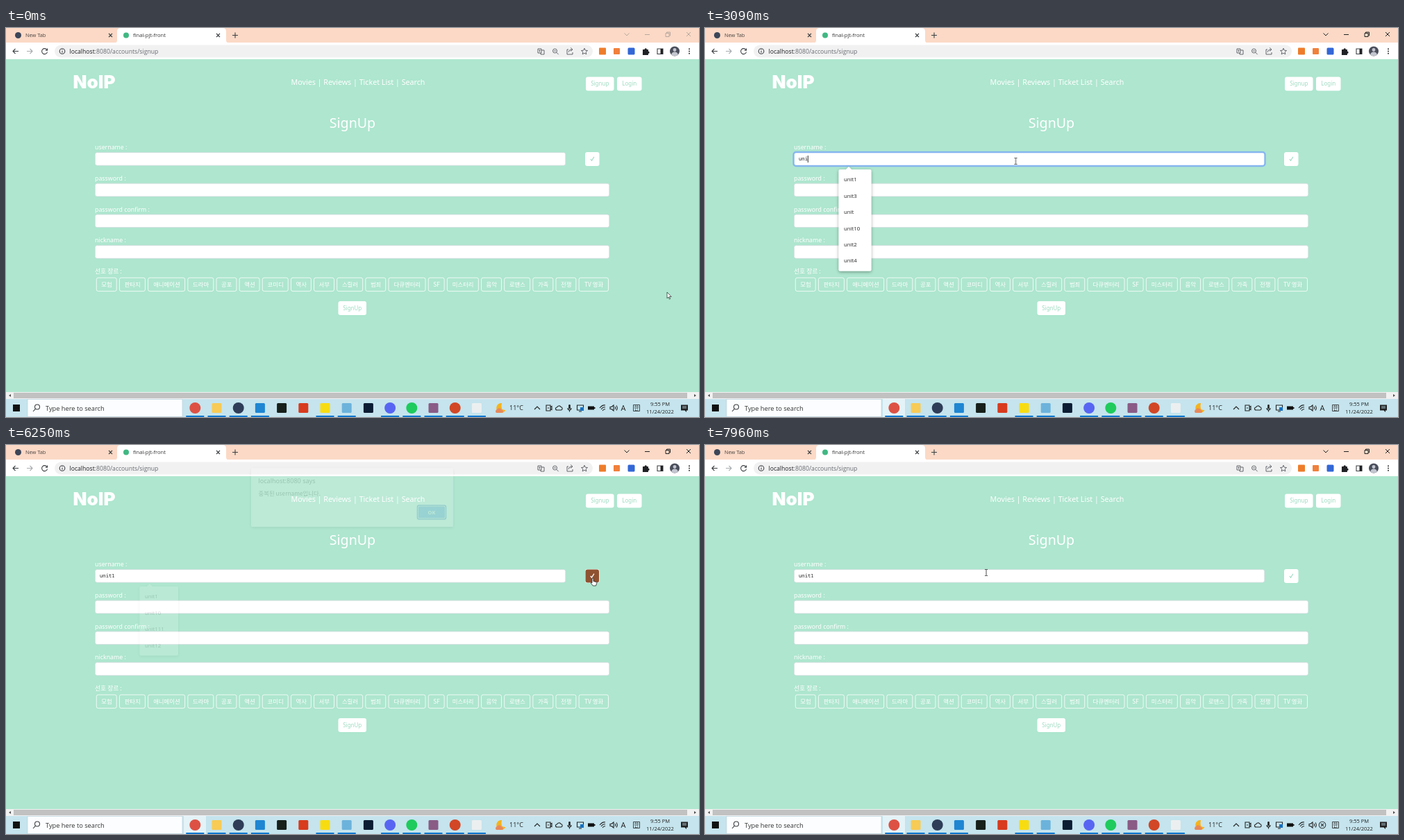
An HTML page for the animation above (8 s loop, 998x561 px).

```html
<!DOCTYPE html>
<html lang="en">
<head>
<meta charset="utf-8">
<title>Sign up form</title>
<style>
html, body { margin: 0; width: 100%; height: 100%; overflow: hidden; background: #aee6cf; }
svg { display: block; width: 100vw; height: 100vh; }
text { font-family: "Open Sans", "Noto Sans", sans-serif; white-space: pre; }
.page text { font-family: "Noto Sans", "Noto Sans CJK KR", sans-serif; }
.kr, .page .kr { font-family: "Noto Sans CJK KR", "Noto Sans CJK", sans-serif; }
.page .logo { font-family: Inter, sans-serif; font-weight: 900; }
.page .mono { font-family: "Noto Sans Mono", "DejaVu Sans Mono", monospace; font-weight: 500; }
.mid { text-anchor: middle; }
.line { fill: none; stroke: #3c4043; stroke-width: 1.1; }

/* one loop is 8 s, so 1% is 80 ms */
.cut { animation: 8s step-end infinite; }
.flow { animation: 8s linear infinite; }
.off { opacity: 0; }

#win { animation-name: win; stroke: #b9a79d; }
@keyframes win { 20.25%, 100% { stroke: #222; } }
#chatTile { animation-name: chatTile; }
@keyframes chatTile { 0%, .8% { opacity: 0; } 1.6%, 20% { opacity: 1; } 21.2%, 100% { opacity: 0; } }
#webTile { animation-name: webTile; }
@keyframes webTile { 0%, 20% { opacity: 0; } 21.2%, 100% { opacity: 1; } }
#imeA { animation-name: imeA; }
@keyframes imeA { 0% { opacity: 1; } 1.25% { opacity: 0; } 20.25% { opacity: 1; } 79% { opacity: 0; } }
#imeK { animation-name: imeK; }
@keyframes imeK { 1.25% { opacity: 1; } 20.25% { opacity: 0; } }
#imeX { animation-name: imeX; }
@keyframes imeX { 79%, 100% { opacity: 1; } }

#ring { animation-name: ring; }
@keyframes ring { 0%, 20% { opacity: 0; } 21.6%, 76.8% { opacity: 1; } 77.8%, 100% { opacity: 0; } }
#typing { animation-name: typing; }
@keyframes typing {
  0% { transform: none; }
  31.875% { transform: translateX(4.32px); }
  35.25% { transform: translateX(8.64px); }
  38.625% { transform: translateX(12.96px); }
  43.5% { transform: translateX(17.28px); }
  50.25%, 100% { transform: translateX(21.6px); }
}
#caret { animation-name: caret; }
@keyframes caret {
  20.25% { opacity: 1; } 26.875% { opacity: 0; }
  31.875% { opacity: 1; } 59.375% { opacity: 0; }
  66% { opacity: 1; } 72.6% { opacity: 0; }
}
#popA { animation-name: popA; }
@keyframes popA { 31.875% { opacity: 1; } 51.5% { opacity: 0; } }
#popB { animation-name: popB; }
@keyframes popB {
  0%, 51.49% { opacity: 0; } 51.5%, 76.8% { opacity: 1; }
  78.125% { opacity: .16; } 79%, 100% { opacity: 0; }
}
#hover { animation-name: hover; }
@keyframes hover { 0%, 72.2% { opacity: 0; } 73%, 96% { opacity: 1; } 97.5%, 100% { opacity: 0; } }
#dialog { animation-name: dialog; }
@keyframes dialog {
  0%, 77.4% { opacity: 0; transform: translateY(-11px); }
  78.125% { opacity: .18; transform: translateY(-10px); }
  80.75%, 95.25% { opacity: 1; transform: translateY(0); }
  98.5%, 100% { opacity: 0; transform: translateY(-7px); }
}
#cursor { animation-name: cursor; }
@keyframes cursor {
  0%, 3.4% { transform: translate(952px, 381px); }
  5.5% { transform: translate(900px, 402px); }
  7.6% { transform: translate(785px, 415px); }
  9.7% { transform: translate(630px, 393px); }
  11.8% { transform: translate(500px, 343px); }
  13.625%, 13.9% { transform: translate(440px, 316px); }
  14.5% { transform: translate(442px, 292px); }
  16.125%, 18% { transform: translate(451px, 203px); }
  18.625%, 55.2% { transform: translate(447.5px, 192px); }
  55.25%, 62.8% { transform: translate(446.8px, 192px); }
  66.25% { transform: translate(570px, 199px); }
  70% { transform: translate(770px, 217px); }
  71.8% { transform: translate(823px, 203px); }
  73%, 84.2% { transform: translate(845px, 192px); }
  84.875% { transform: translate(833.5px, 192px); }
  88.5% { transform: translate(715px, 152px); }
  92.5%, 94.6% { transform: translate(615px, 107px); }
  99.4%, 100% { transform: translate(405px, 184px); }
}
#arrow { animation-name: arrow; }
@keyframes arrow {
  0% { opacity: 1; } 13.1% { opacity: 0; } 14.1% { opacity: 1; } 18.25% { opacity: 0; }
  66.25% { opacity: 1; } 72.4% { opacity: 0; } 85.4% { opacity: 1; } 98.6% { opacity: 0; }
}
#beam { animation-name: beam; }
@keyframes beam {
  13.1% { opacity: 1; } 14.1% { opacity: 0; } 18.25% { opacity: 1; }
  66.25% { opacity: 0; } 98.6%, 100% { opacity: 1; }
}
#hand { animation-name: hand; }
@keyframes hand { 72.4% { opacity: 1; } 85.4% { opacity: 0; } }
</style>
</head>
<body>
<svg viewBox="0 0 998 561">
  <defs>
    <filter id="soft" x="-20%" y="-20%" width="140%" height="150%">
      <feDropShadow dx="0" dy="1.5" stdDeviation="2" flood-opacity=".35"/>
    </filter>
  </defs>

  <!-- browser frame -->
  <rect width="998" height="22" fill="#fbd9c6"/>
  <rect y="21" width="998" height="24" fill="#fff"/>
  <path d="M156 21.5q4 0 4-4V5q0-5 5-5h147q5 0 5 5v12.5q0 4 4 4z" fill="#fff"/>
  <circle cx="17.5" cy="10.5" r="4.5" fill="#3c4658"/>
  <circle cx="173" cy="10.5" r="4" fill="#41b883"/>
  <text x="28" y="13.2" font-size="7.4" fill="#4a4340">New Tab</text>
  <text x="183" y="13.2" font-size="7.6" fill="#333">final-pjt-front</text>
  <path class="line" d="M148 8l5 5m0-5l-5 5M303 8l5 5m0-5l-5 5M326 10.5h8m-4-4v8"/>
  <g id="win" class="cut" fill="none" stroke-width="1">
    <path d="M890.5 7.5l3.5 3.5 3.5-3.5M920 9.5h7M950 7.5h5v5h-5zM951.5 7V6h5v5h-1M980 6l6 6m0-6l-6 6"/>
  </g>
  <path class="line" d="M18 33.5h-8m3.5-3.5L10 33.5l3.5 3.5"/>
  <path class="line" style="stroke:#a9acaf" d="M30 33.5h8m-3.5-3.5l3.5 3.5-3.5 3.5"/>
  <path class="line" d="M59 31.5a4 4 0 1 0 .5 3M59.5 29.5v2.8h-2.8"/>
  <rect x="70" y="24.5" width="775" height="18" rx="9" fill="#f1f1f2"/>
  <circle class="line" cx="81" cy="33.5" r="3.8"/>
  <path class="line" d="M81 33v2.5m0-4.2v.8"/>
  <text x="91.5" y="36.7" font-size="8.67" fill="#666a6e"><tspan fill="#202124">localhost</tspan>:8080/accounts/signup</text>
  <g class="line" style="stroke:#55595d;stroke-width:.9">
    <path d="M766 30h5v6h-5zM771 32h4v6h-5v-2M767.5 32h2m-1 0v2.5"/>
    <circle cx="790.5" cy="33" r="3"/><path d="M792.7 35.2l3 3M789 33h3"/>
    <path d="M810 31h-2v7h8v-3M810 35q.5-4 5-4m-2-2.5l3 2.5-3 2.5"/>
    <path d="M833 29.2l1.3 3 3.2.3-2.4 2.2.7 3.2-2.8-1.7-2.8 1.7.7-3.2-2.4-2.2 3.2-.3z"/>
  </g>
  <rect x="854" y="28.5" width="10" height="10" rx="1" fill="#ee7d2b"/>
  <rect x="875" y="29" width="9" height="9" rx="1" fill="#f0803c"/>
  <rect x="895.5" y="28.5" width="10" height="10" rx="1.5" fill="#3367d6"/>
  <path d="M917 31h2.5a1.7 1.7 0 0 1 3.4 0h2v2.5a1.7 1.7 0 0 1 0 3.4v2h-8z" fill="#202124"/>
  <path class="line" d="M938 30h8v7.5h-8z"/><path d="M942.5 30h3.5v7.5h-3.5z" fill="#202124"/>
  <circle cx="963" cy="33.5" r="7" fill="#4b4f5c"/>
  <path d="M958 38.5q1-4 5-4t5 4q-5 4-10 0z" fill="#c3c6cf"/><circle cx="963" cy="31.5" r="2.4" fill="#c3c6cf"/>
  <g fill="#333"><circle cx="984" cy="30.3" r="1"/><circle cx="984" cy="33.5" r="1"/><circle cx="984" cy="36.7" r="1"/></g>

  <!-- web page -->
  <g class="page">
    <rect y="45" width="998" height="480" fill="#aee6cf"/>
    <text class="logo" x="96.5" y="87" font-size="26" fill="#fff">NolP</text>
    <text class="mid" x="507" y="81.8" font-size="10.7" fill="#fff" font-weight="500">Movies | Reviews | Ticket List | Search</text>
    <text class="mid" x="499" y="144" font-size="19.6" fill="#fff">SignUp</text>
    <g id="form"></g>
    <rect id="ring" class="flow" x="127.5" y="179" width="679" height="20" rx="3.5" fill="#fff" stroke="#86b6ee" stroke-width="2.4"/>
    <text class="mono" x="135" y="191.3" font-size="7.2" fill="#222">unit1</text>
    <g id="typing" class="cut">
      <rect x="135" y="183" width="28" height="12" fill="#fff"/>
      <path id="caret" class="cut off" d="M135.3 184v10" stroke="#111" stroke-width=".9"/>
    </g>
    <g id="hover" class="flow">
      <rect x="834.5" y="179.5" width="19.5" height="19" rx="3" fill="#8f5230"/>
      <path d="M841.8 189l1.7 2.2 3.4-5.5" fill="none" stroke="#fff" stroke-width="1.3"/>
    </g>
  </g>
  <g id="popA" class="cut off"></g>
  <g id="popB" class="flow"></g>

  <g id="dialog" class="flow">
    <rect x="353" y="43" width="291" height="85" rx="2" fill="#fff" filter="url(#soft)"/>
    <text x="363.5" y="65" font-size="9.1" fill="#222">localhost:8080 says</text>
    <text class="kr" x="363.5" y="83" font-size="8.4" fill="#333">중복된 username입니다.</text>
    <rect x="592.5" y="97" width="41" height="20" rx="2.5" fill="#fff" stroke="#2f66c4" stroke-width="1.6"/>
    <rect x="594" y="98.5" width="38" height="17" rx="1.5" fill="#3b78e0"/>
    <text class="mid" x="613" y="109.8" font-size="7.5" font-weight="700" fill="#fff">OK</text>
  </g>

  <!-- scrollbar and taskbar -->
  <rect y="525" width="998" height="10" fill="#f1f1f1"/>
  <rect x="11" y="526" width="970" height="8" fill="#c1c1c1"/>
  <path d="M7 528v4l-3-2zM991 528v4l3-2z" fill="#505050"/>
  <rect y="535" width="998" height="26" fill="#c5e4ed"/>
  <rect x="10" y="543" width="10" height="10" fill="#111"/>
  <rect x="31" y="535.5" width="223" height="25" fill="#fbfdfe" stroke="#b9ced5" stroke-width=".6"/>
  <circle class="line" cx="45" cy="546.5" r="3.5"/><path class="line" d="M42.5 549.2l-3.5 3.8"/>
  <text x="57" y="551.5" font-size="9.25" fill="#333">Type here to search</text>
  <rect id="webTile" class="flow" x="256" y="535" width="32" height="26" fill="#e3f3f7"/>
  <rect id="chatTile" class="flow" x="445" y="535" width="29" height="26" fill="#f1f9fb"/>
  <g id="apps"></g>
  <path d="M714 541a7 7 0 1 0 5.5 10q-8 1-5.5-10z" fill="#f5b41d"/>
  <path d="M706 555a3 3 0 0 1 1-5 4 4 0 0 1 7 1 2 2 0 0 1 0 4z" fill="#e8895b"/>
  <text x="725" y="551.3" font-size="9" fill="#222">11°C</text>
  <g class="line" style="stroke:#222">
    <path d="M761 550l4-4 4 4M778 544h6v8h-6zM784 547l2-1.5v5l-2-1.5M780 548h2"/>
    <path d="M793.5 551a2 2 0 0 1 0-4 3 3 0 0 1 5.5-.5 2.3 2.3 0 0 1 .5 4.5z"/>
    <path d="M809 548q0 3 2.5 3t2.5-3m-2.5 3v2.5"/>
    <path d="M822.5 544h9v7h-9zM825 553h4"/>
    <path d="M855 548q4-5 8-4M857 550q3-4 6-3M859 552q2-3 4-2"/>
    <path d="M870 546.5h2l3-2.5v8l-3-2.5h-2zM877 546q1.5 2 0 4M879 544.5q2.5 3.5 0 7"/>
    <path d="M903.5 543.5h9v9h-9z" stroke-width=".8"/>
  </g>
  <rect x="810.2" y="543" width="2.6" height="6.5" rx="1.3" fill="#222"/>
  <rect x="827" y="547" width="5" height="5" fill="#1670c0"/>
  <path d="M838 545.5h9v5h-9zM847 547h1.5v2H847z" fill="#111"/>
  <g fill="#222">
    <text id="imeA" class="mid cut off" x="889" y="552" font-size="11">A</text>
    <text id="imeK" class="mid kr cut off" x="889.5" y="551.8" font-size="10.5">가</text>
    <g id="imeX" class="cut off">
      <circle class="line" cx="889" cy="548" r="4.8"/>
      <path class="line" d="M887 546l4 4m0-4l-4 4"/>
    </g>
    <text class="mid kr" x="908" y="551" font-size="7.5">한</text>
    <text class="mid" x="942" y="544.5" font-size="7.5">9:55 PM</text>
    <text class="mid" x="942" y="556.3" font-size="7.5">11/24/2022</text>
    <path d="M972 543.5h10v8h-2v2.5l-2.5-2.5H972z"/>
  </g>
  <path d="M974 546h6m-6 2h6" stroke="#c5e4ed" stroke-width=".8"/>

  <!-- pointer, hot spot at 0,0 -->
  <g id="cursor" class="flow">
    <path id="arrow" class="cut off" d="M0 0v8.8l2-1.8 1.4 3.1 1.3-.6-1.4-3h2.9z" fill="#fff" stroke="#222" stroke-width=".7"/>
    <path id="beam" class="cut off" d="M-2-4.5h1.5L0-4l.5-.5H2M0-4v8M-2 4.5h1.5L0 4l.5.5H2" fill="none" stroke="#222" stroke-width=".8"/>
    <path id="hand" class="cut off" d="M-1 .5q1-1.3 2 0v4l4 1q1 .5.7 2L4.5 11H.3L-2.8 7q0-1.5 1.8-.3z" fill="#fff" stroke="#222" stroke-width=".8"/>
  </g>
</svg>
<script>
const PALE = '#9fdcc3';
const fill = (id, html) => { document.getElementById(id).innerHTML = html; };
const box = (x, y, w, h, r, paint) => `<rect x="${x}" y="${y}" width="${w}" height="${h}" rx="${r}" ${paint}/>`;
const text = (x, y, size, color, str, cls = '') =>
  `<text class="${cls}" x="${x}" y="${y}" font-size="${size}" fill="${color}">${str}</text>`;
const button = (x, y, w, label) =>
  box(x, y, w, 20, 3, 'fill="#fff"') + text(x + w / 2, y + 12.9, 8, PALE, label, 'mid');

// form: labelled fields, genre chips, buttons
let form = '';
['username', 'password', 'password confirm', 'nickname'].forEach((name, i) => {
  const y = 179.5 + i * 44.7;
  form += text(128, y - 4.2, 8.8, '#fff', name + ' :')
    + box(128.3, y, i ? 740.5 : 677.5, 18.7, 3, 'fill="#fff" stroke="#ced9dc" stroke-width=".7"');
});
form += text(128, 354, 8.8, '#fff', '선호 장르 :', 'kr');
const genres = '모험,판타지,애니메이션,드라마,공포,액션,코미디,역사,서부,스릴러,범죄,다큐멘터리,SF,미스터리,음악,로맨스,가족,전쟁,TV 영화';
let chipX = 130.3;
for (const name of genres.split(',')) {
  const w = name === 'SF' ? 23.5 : name === 'TV 영화' ? 43 : 13.4 + 8.05 * name.length;
  form += box(chipX, 360.2, w - .6, 19.4, 2.5, 'fill="none" stroke="#fff" stroke-width=".8"')
    + text(chipX + w / 2, 372.6, 8.4, '#fff', name, 'mid kr');
  chipX += w + 3.62;
}
form += button(835, 70.5, 40.5, 'Signup') + button(880, 70.5, 35.5, 'Login')
  + button(478.5, 394, 40.5, 'SignUp') + box(834, 179, 20.5, 20, 3, 'fill="#fff"')
  + `<path d="M841.8 189l1.7 2.2 3.4-5.5" fill="none" stroke="${PALE}" stroke-width="1.2"/>`;
fill('form', form);

// autofill lists
const list = (w, items) =>
  `<g filter="url(#soft)"><path d="M202.5 204.5l4.5-4.5 4.5 4.5z" fill="#fff"/>`
  + box(192.5, 204, w, items.length * 23.4 + 6, 2, 'fill="#fff"') + '</g>'
  + items.map((s, i) => text(200, 221.3 + i * 23.4, 7.8, '#222', s)).join('');
fill('popA', list(47, ['unit1', 'unit3', 'unit', 'unit10', 'unit2', 'unit4']));
fill('popB', list(55.5, ['unit1', 'unit10', 'unit111', 'unit12']));

// taskbar apps: colour, round or square, running or not
const apps = [
  ['#dd5144', 1, 1], ['#f7cb55', 0, 1], ['#2f3d58', 1, 1], ['#1f86d2', 0, 1], ['#17201b', 0, 0],
  ['#d83b1e', 0, 0], ['#f8dc12', 0, 1], ['#6cb3dc', 0, 1], ['#0c1d33', 0, 0], ['#5865f2', 1, 1],
  ['#1ecb5c', 1, 1], ['#8a5c86', 0, 1], ['#d24726', 1, 1], ['#eceff0', 0, 1],
];
fill('apps', apps.map(([color, round, running], i) => {
  const x = 272.3 + i * 31.2;
  const s = round ? 16 : 14;
  return box(x - s / 2, 548 - s / 2, s, s, round ? s / 2 : 1.5, `fill="${color}"`)
    + (running ? box(x - 13, 559, 26, 2, 0, 'fill="#0a78d0"') : '');
}).join(''));
</script>
</body>
</html>
```
